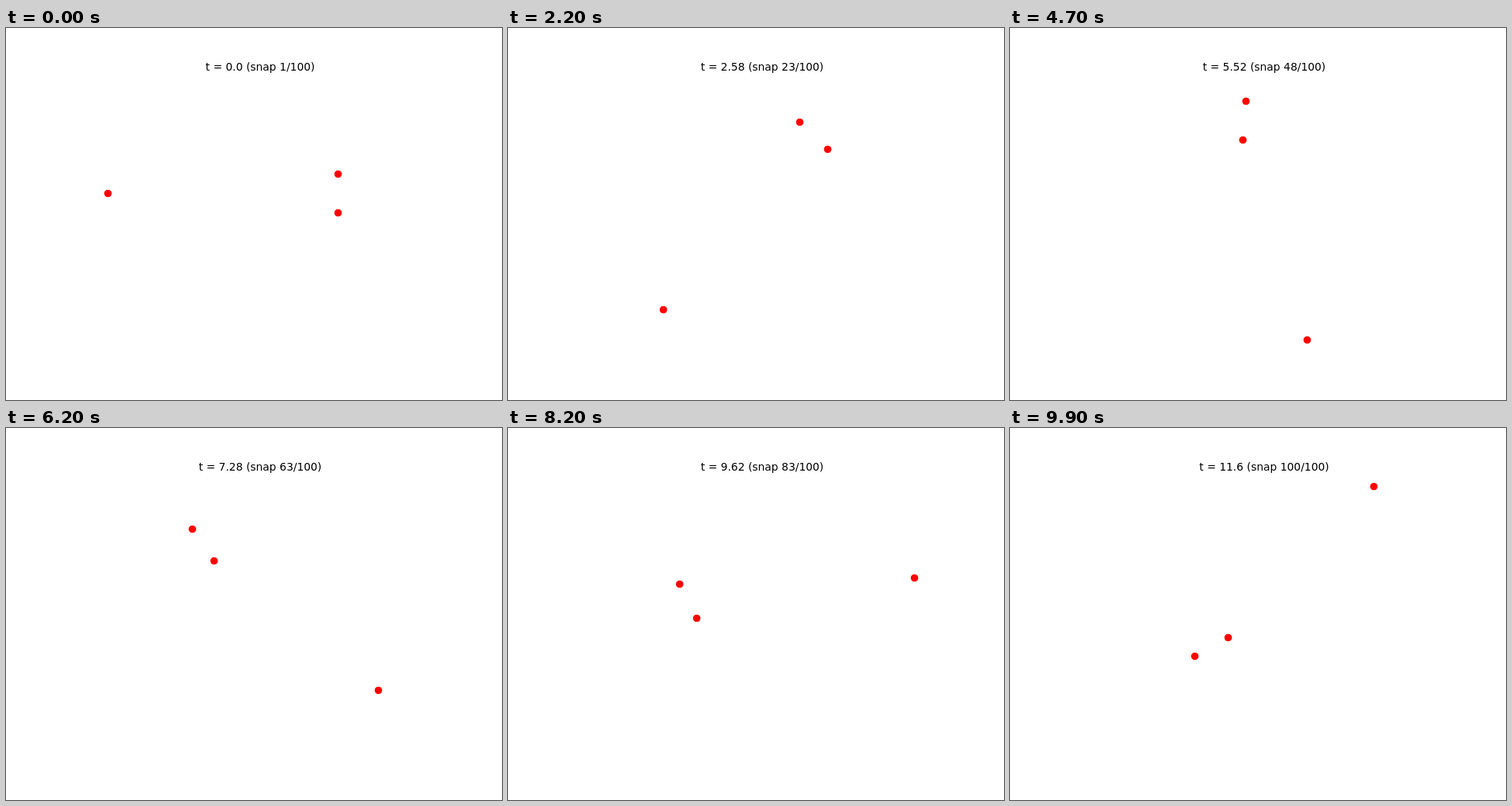
An HTML page with a canvas for the animation above (10000 ms loop, 640x480 px).

```html
<!DOCTYPE html>
<html lang="en">
<head>
<meta charset="utf-8">
<title>Three bodies</title>
<style>
html, body { margin: 0; width: 100%; height: 100%; overflow: hidden; background: #fff; }
canvas { display: block; }
</style>
</head>
<body>
<canvas id="stage" width="640" height="480"></canvas>
<script>
const ctx = document.getElementById('stage').getContext('2d');
const SNAPS = 100, SNAP_MS = 100;
const STEPS = 580, DT = 0.02, SUB = 20;
const SCALE = 99, CX = 329.2, CY = 213.1, RADIUS = 4.86;

// Unit masses, G = 1: a tight circular pair and a third body circling it.
const bodies = [
  { x: -2, y: 0, vx: 0, vy: -2 / 3 },
  { x: 1, y: 0.25, vx: -1, vy: 1 / 3 },
  { x: 1, y: -0.25, vx: 1, vy: 1 / 3 }
];

function kick(h) {
  for (const a of bodies) {
    for (const b of bodies) {
      if (a === b) continue;
      const dx = b.x - a.x, dy = b.y - a.y;
      const f = h / Math.hypot(dx, dy) ** 3;
      a.vx += f * dx;
      a.vy += f * dy;
    }
  }
}

function advance(h) {
  kick(h / 2);
  for (const b of bodies) {
    b.x += h * b.vx;
    b.y += h * b.vy;
  }
  kick(h / 2);
}

function simulate() {
  const snaps = [];
  for (let step = 0; step <= STEPS; step++) {
    if (step === Math.ceil(snaps.length * STEPS / (SNAPS - 1))) {
      snaps.push({ step, points: bodies.map(b => [b.x, b.y]) });
    }
    for (let i = 0; i < SUB; i++) advance(DT / SUB);
  }
  return snaps;
}

const snaps = simulate();

function timeLabel(step) {
  const t = step / 50;
  return Number.isInteger(t) ? t + '.0' : String(t);
}

function draw(index) {
  const { step, points } = snaps[index];
  ctx.fillStyle = '#fff';
  ctx.fillRect(0, 0, 640, 480);
  ctx.fillStyle = '#f00';
  for (const [x, y] of points) {
    ctx.beginPath();
    ctx.arc(Math.round(CX + SCALE * x) + 0.5, Math.round(CY - SCALE * y) + 0.5, RADIUS, 0, 2 * Math.PI);
    ctx.fill();
  }
  ctx.fillStyle = '#000';
  ctx.font = '13.89px "DejaVu Sans", sans-serif';
  ctx.textAlign = 'center';
  ctx.fillText(`t = ${timeLabel(step)} (snap ${index + 1}/${SNAPS})`, 328, 55);
}

const start = performance.now();
function tick() {
  draw(Math.floor((performance.now() - start) / SNAP_MS) % SNAPS);
  requestAnimationFrame(tick);
}
tick();
</script>
</body>
</html>
```
